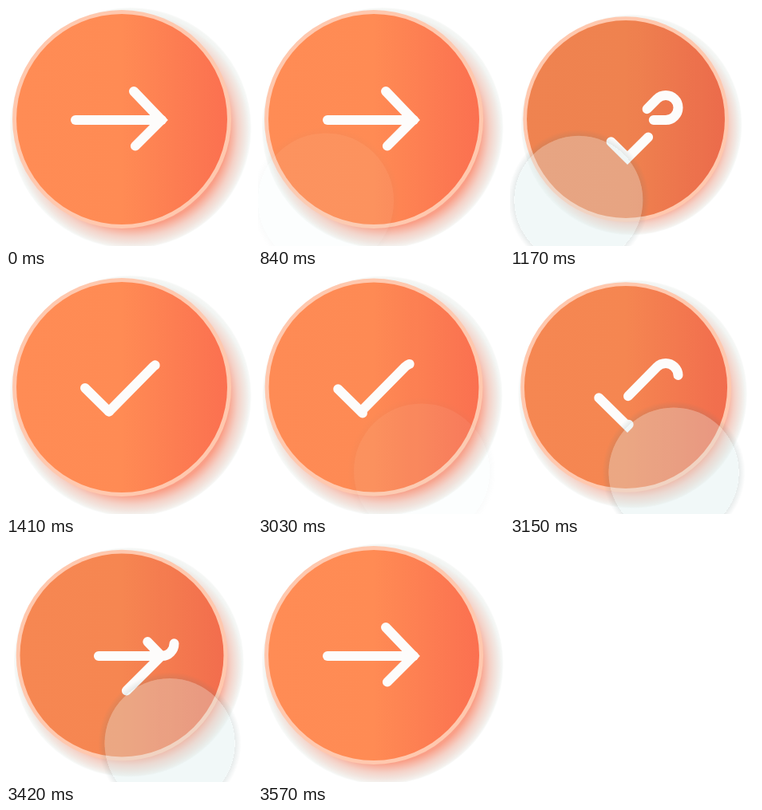
Animation, 308 px wide and 301 px high, one loop 4320 ms. Source, as an HTML page with a canvas:

```html
<!DOCTYPE html>
<html lang="en">
<head>
<meta charset="utf-8">
<title>Arrow to check button</title>
<style>
  html, body { margin: 0; width: 100%; height: 100%; overflow: hidden; background: #fff; }
  canvas { display: block; }
</style>
</head>
<body>
<canvas id="stage" width="308" height="301"></canvas>
<script>
const ctx = document.getElementById('stage').getContext('2d');
const LOOP = 4320, STEP = 30, DURATION = 600;
const CX = 145, CY = 142;

const lerp = (a, b, k) => a + (b - a) * k;
const clamp = v => Math.min(1, Math.max(0, v));
const smooth = u => u * u * (3 - 2 * u);

function disc(x, y, r, fill) {
  ctx.beginPath();
  ctx.arc(x, y, r, 0, Math.PI * 2);
  ctx.fillStyle = fill;
  ctx.fill();
}

function radial(x, y, r, stops) {
  const g = ctx.createRadialGradient(x, y, 0, x, y, r);
  for (const [at, color] of stops) g.addColorStop(at, color);
  return g;
}

function drawButton(press) {
  // The shadow pulls in under the button while it is pressed
  const offset = lerp(11, 7, press), r = lerp(151, 138, press);
  const x = CX + offset, y = CY + offset;
  disc(x, y, r, radial(x, y, r, [
    [0, '#f0f3f1'], [.95, '#f0f3f1'], [.985, '#f4f6f4'], [1, '#fafbfa']
  ]));
  const gx = x + 1, gy = y + 3, gr = r - 3;
  disc(gx, gy, gr, radial(gx, gy, gr, [
    [0, 'rgba(255,115,80,.75)'], [.82, 'rgba(255,115,80,.65)'],
    [.9, 'rgba(255,130,100,.3)'], [1, 'rgba(255,150,120,0)']
  ]));

  const scale = 1 - .062 * press;
  disc(CX, CY, 137 * scale, '#ffc8ae');
  const g = ctx.createLinearGradient(CX - 132, 0, CX + 132, 0);
  g.addColorStop(0, '#ff8c55');
  g.addColorStop(.5, '#ff8b54');
  g.addColorStop(1, '#fb7050');
  disc(CX, CY, 132 * scale, g);
  disc(CX, CY, 132 * scale, `rgba(0,0,0,${.065 * press})`);
}

function strokePart(from, to) {
  ctx.setLineDash([to - from, 999]);
  ctx.lineDashOffset = -from;
  ctx.stroke();
}

// Both strokes slide along fixed tracks: p = 0 is the arrow, p = 1 the check
function drawIcon(p) {
  ctx.strokeStyle = '#fdfcfb';
  ctx.lineWidth = 12;
  ctx.lineCap = 'round';
  ctx.lineJoin = 'miter';

  ctx.beginPath();
  ctx.moveTo(87, 143);
  ctx.lineTo(195, 143);
  ctx.arc(195, 127.5, 15.5, Math.PI / 2, -Math.PI * .75, true);
  ctx.lineTo(129, 172.5);
  strokePart(lerp(0, 165, p), lerp(108, 247, p));

  ctx.beginPath();
  ctx.moveTo(160, 107);
  ctx.lineTo(194.5, 143);
  ctx.lineTo(147, 190.5);
  ctx.lineTo(99, 143);
  strokePart(lerp(0, 142.5, p), lerp(96, 184.6, p));
}

function drawTouch(x, y, age) {
  const alpha = clamp(Math.min(age / 150, (570 - age) / 150));
  const r = 86 - 6 * Math.sin(Math.PI * age / 570), outer = r + 8;
  ctx.globalAlpha = alpha;
  disc(x, y, outer, radial(x, y, outer, [
    [0, 'rgba(90,120,120,0)'], [r / outer, 'rgba(90,120,120,0)'],
    [r / outer + .001, 'rgba(90,120,120,.14)'], [1, 'rgba(90,120,120,0)']
  ]));
  disc(x, y, r, 'rgba(212,232,232,.33)');
  ctx.globalAlpha = 1;
}

function draw(t) {
  const forward = t >= 840 && t < 1410;
  const back = t >= 3030 && t < 3570;
  let p = t >= 1410 && t < 3030 ? 1 : 0, press = 0;
  if (forward || back) {
    const u = clamp((t - (forward ? 845 : 2980)) / DURATION);
    p = forward ? smooth(u) : 1 - smooth(u);
    press = Math.sin(Math.PI * u) ** 2;
  }

  ctx.clearRect(0, 0, 308, 301);
  drawButton(press);
  drawIcon(p);
  if (forward) {
    const age = t - 810;
    drawTouch(85 + age / 400, 244.5 - age / 300, age);
  } else if (back) {
    const age = t - 3000;
    drawTouch(205, 247 + age / 75, age);
  }
}

const start = performance.now();
function tick() {
  const t = (performance.now() - start) % LOOP;
  draw(Math.floor(t / STEP) * STEP);
  requestAnimationFrame(tick);
}
tick();
</script>
</body>
</html>
```
